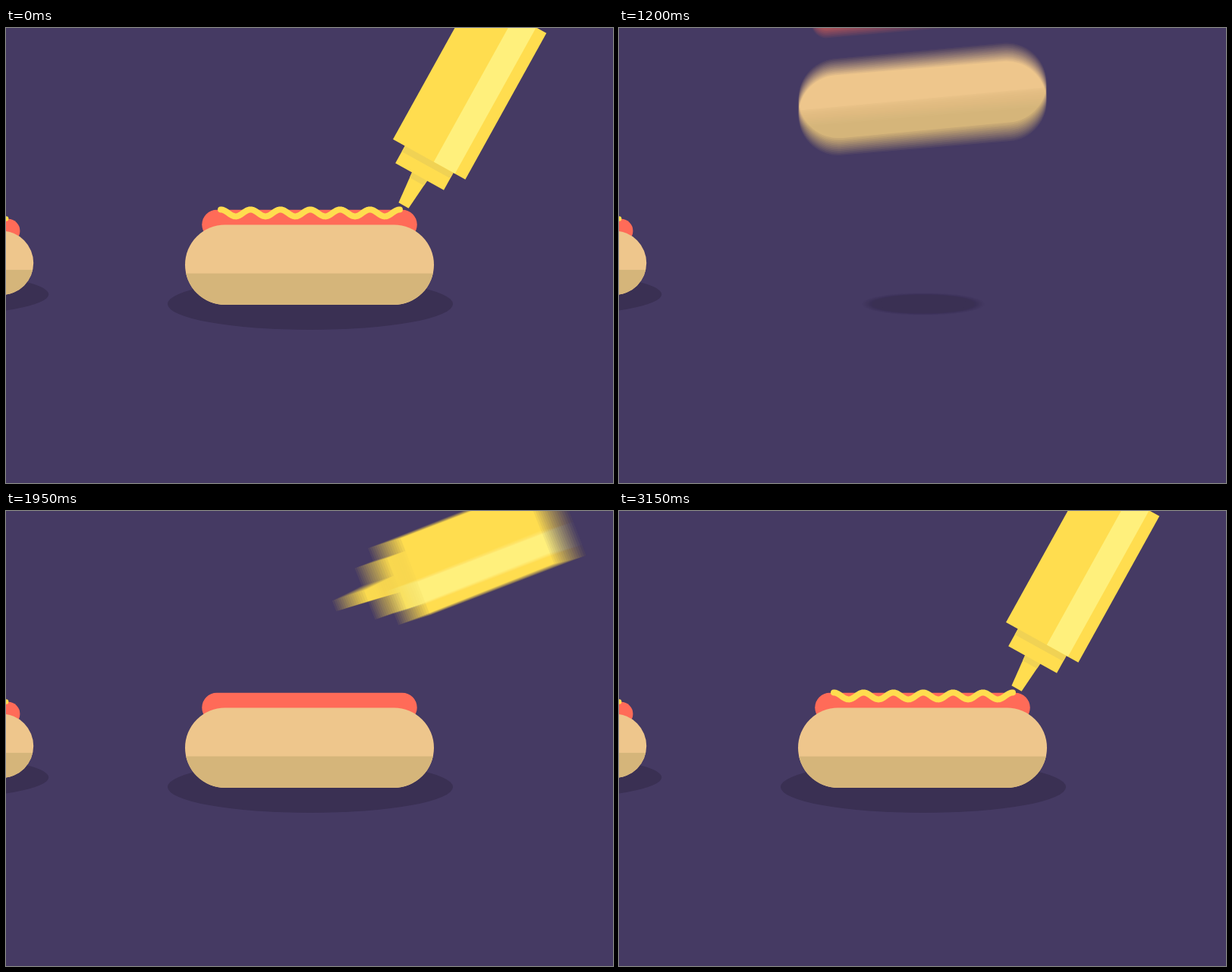
These frames come from a looping animation (800x600 px, 3.18 s). An HTML page with a canvas:

```html
<!DOCTYPE html>
<html lang="en">
<head>
<meta charset="utf-8">
<title>Hot dog line</title>
<style>
  html, body { margin: 0; width: 100%; height: 100%; overflow: hidden; background: #453a63; }
  canvas { display: block; width: 800px; height: 600px; }
</style>
</head>
<body>
<canvas id="stage" width="800" height="600"></canvas>
<script>
const LOOP = 3180, STEP = 30, SHUTTER = 15;
const C = {
  bg: '#453a63', shadow: '#3a3053', bun: '#eec68c', crust: '#d5b57a', sausage: '#ff6b58',
  yellow: '#ffdd4f', light: '#fff07c', dim: '#f0d254'
};

const out = document.getElementById('stage').getContext('2d');
const layer = document.createElement('canvas');
layer.width = 800;
layer.height = 600;
const g = layer.getContext('2d');

const clamp = v => Math.min(1, Math.max(0, v));
const mix = (a, b, p) => a + (b - a) * p;
const span = (t, from, to) => clamp((t - from) / (to - from));
const smooth = u => u * u * (3 - 2 * u);

function bezier(x1, y1, x2, y2) {
  const at = (a, b, s) => 3 * (1 - s) * (1 - s) * s * a + 3 * (1 - s) * s * s * b + s * s * s;
  return u => {
    if (u <= 0 || u >= 1) return clamp(u);
    let lo = 0, hi = 1;
    for (let i = 0; i < 24; i++) {
      const mid = (lo + hi) / 2;
      if (at(x1, x2, mid) < u) lo = mid; else hi = mid;
    }
    return at(y1, y2, lo);
  };
}
const panEase = bezier(.5, 0, 0, 1);
const shadowEase = bezier(.33, 0, .2, 1);
const squeezeEase = bezier(.45, 0, .55, 1);

// Damped swing shared by everything that lands.
const FALL = 1.68, SWING = .02, DAMP = .008;
const drop = (s, bounce) =>
  s < 0 ? FALL * s : bounce * Math.exp(-DAMP * s) * Math.sin(SWING * s);
const settle = s => s < 0 ? 1 : Math.exp(-DAMP * s) * Math.cos(SWING * s);

function placed(x, y, deg, scale, draw) {
  g.save();
  g.translate(x, y);
  g.rotate(deg * Math.PI / 180);
  g.scale(scale, scale);
  draw();
  g.restore();
}

function box(x, y, w, h, color) {
  g.fillStyle = color;
  g.fillRect(x, y, w, h);
}

function taper(y1, half1, y2, half2, color) {
  g.fillStyle = color;
  g.beginPath();
  g.moveTo(-half1, y1);
  g.lineTo(half1, y1);
  g.lineTo(half2, y2);
  g.lineTo(-half2, y2);
  g.fill();
}

function pill(w, h) {
  const r = h / 2, c = w / 2 - r;
  g.beginPath();
  g.arc(-c, 0, r, Math.PI / 2, Math.PI * 1.5);
  g.arc(c, 0, r, -Math.PI / 2, Math.PI / 2);
  g.closePath();
}

function drawShadow(size) {
  if (size <= 0) return;
  g.fillStyle = C.shadow;
  g.beginPath();
  g.ellipse(1, 64, 188 * size, 34 * size, 0, 0, Math.PI * 2);
  g.fill();
}

// Tilts about its left end.
function drawSausage(y, tilt) {
  placed(-122 + tilt * .9, y - 40.7, tilt, 1, () => {
    g.translate(122, 0);
    pill(283.5, 39);
    g.fillStyle = C.sausage;
    g.fill();
  });
}

function drawBun(y) {
  placed(0, y + 12.3, y * .023, 1, () => {
    pill(328, 105.5);
    g.fillStyle = C.bun;
    g.fill();
    g.clip();
    box(-170, 11.3, 340, 60, C.crust);
  });
}

function drawMustard(p) {
  if (p <= 0) return;
  const from = -117, to = mix(from, 119, p), wave = 236 / 6;
  g.beginPath();
  for (let x = from; x < to + 1; x++) {
    const px = Math.min(x, to);
    g.lineTo(px, -56.1 - 4.5 * Math.cos((px - from) / wave * Math.PI * 2));
  }
  g.strokeStyle = C.yellow;
  g.lineWidth = 8;
  g.lineCap = g.lineJoin = 'round';
  g.stroke();
}

// Parts are measured from the stage centre.
function drawDog(x, scale, { shadow = 1, sausage = 0, tilt = 0, mustard = 1, bun = 0 } = {}) {
  placed(x, 300, 0, scale, () => {
    drawShadow(shadow);
    drawSausage(sausage, tilt);
    drawMustard(mustard);
    drawBun(bun);
  });
}

// The nozzle opening is the origin.
function drawBottle() {
  taper(0, 7.5, -44, 11.5, C.yellow);
  taper(-36, 10.8, -44, 11.5, C.dim);
  box(-36.5, -70, 73, 26.5, C.yellow);
  box(-36.5, -70, 73, 9, C.dim);
  box(-54.5, -290, 109, 220.5, C.yellow);
  box(7, -290, 32, 220.5, C.light);
}

function bottlePose(t) {
  if (t < 1000) {
    const e = Math.pow(span(t, 30, 420), 3);
    return [524 + 280 * e, 234 - 330 * e, 29 + 18 * e];
  }
  const left = 1 - span(t, 1770, 2190);
  const sweep = left * left * (1.4 * left - .4);
  const slide = squeezeEase(span(t, 2190, 3150));
  return [
    mix(274, 524, slide) + 1369 * sweep,
    234 - 353 * left * left,
    69 - 40 * smooth(span(t, 1940, 2170))
  ];
}

function scene(t) {
  box(0, 0, 800, 600, C.bg);
  const pan = panEase(span(t, 400, 1040));
  drawDog(-95 - 495 * pan, .8);
  drawDog(400 - 495 * pan, 1 - .2 * pan);
  if (t > 1050) {
    drawDog(400, 1, {
      shadow: shadowEase(span(t, 1110, 1440)),
      sausage: drop(t - 1365, 10),
      tilt: -5 * settle(t - 1385),
      mustard: squeezeEase(span(t, 2190, 3150)),
      bun: drop(t - 1330, 36)
    });
  }
  if (t < 420 || t > 1770) {
    const [x, y, deg] = bottlePose(t);
    placed(x, y, deg, 1, drawBottle);
  }
}

// Averages several moments across the shutter for motion blur.
function render(t) {
  const count = t < 30 || t >= 3120 ? 1 : t >= 2190 ? 6 : 16;
  for (let i = 0; i < count; i++) {
    scene(t + ((i + .5) / count - .5) * SHUTTER);
    out.globalAlpha = 1 / (i + 1);
    out.drawImage(layer, 0, 0);
  }
}

const start = performance.now();
let shown = -1;
function tick() {
  const t = Math.floor((performance.now() - start) % LOOP / STEP) * STEP;
  if (t !== shown) render(shown = t);
  requestAnimationFrame(tick);
}
tick();
</script>
</body>
</html>
```
